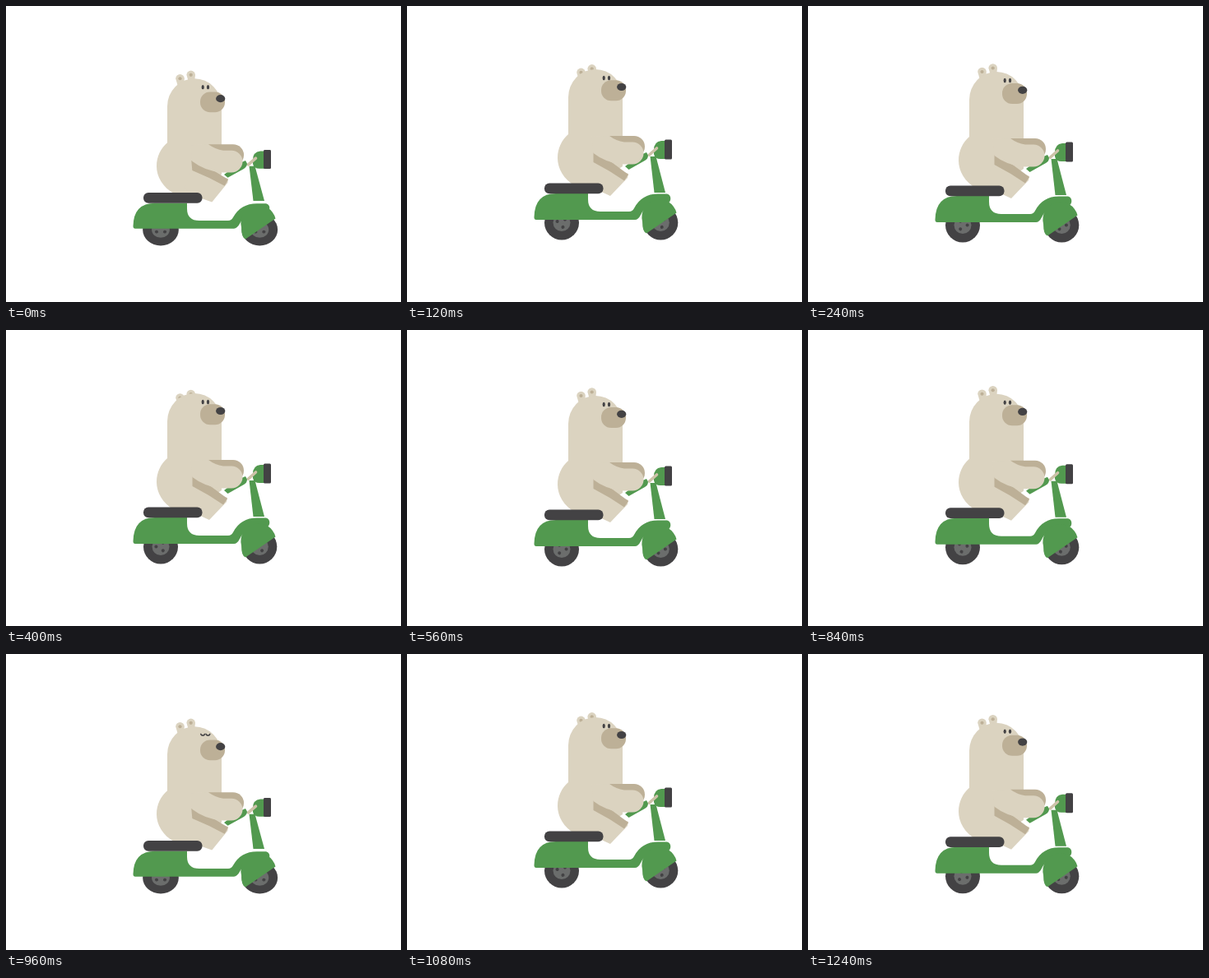
Recreate the animation shown at these times as an HTML page. Size 480 px wide and 360 px high, loop 1.28 s.

```html
<!DOCTYPE html>
<html lang="en">
<head>
<meta charset="utf-8">
<title>Bear on a scooter</title>
<style>
  html, body { margin: 0; height: 100%; overflow: hidden; background: #fff; }
  svg { display: block; width: 100vw; height: 100vh; }
  .fur { fill: #dbd3c0; }
  .tan { fill: #bdb097; }
  .green { fill: #52994f; }
  .dark { fill: #434244; }
  .hub { fill: #6b6d6c; }
</style>
</head>
<body>
<svg viewBox="0 0 480 360">
  <defs>
    <g id="wheel">
      <circle class="dark" r="21"/>
      <circle class="hub" r="10.5"/>
      <g class="dark spin">
        <circle cx="5.6" r="2"/>
        <circle cx="5.6" r="2" transform="rotate(120)"/>
        <circle cx="5.6" r="2" transform="rotate(240)"/>
      </g>
    </g>
    <g id="ear">
      <path class="fur" d="M-5.3 0a5.3 5.3 0 0 1 10.6 0l-1 9h-7z"/>
      <circle class="tan" r="2.1"/>
    </g>
  </defs>

  <g class="tire" data-x="188"><use href="#wheel"/></g>
  <g class="tire" data-x="308.300"><use href="#wheel"/></g>

  <g id="steering">
    <path class="green" d="M295.500 186H302.500L314 230H300.500Z"/>
    <path class="green" d="M314 167H309Q300 168 300 178V183Q301 189 308 189H314Z"/>
    <rect class="dark" x="313" y="165.500" width="9" height="24" rx="1.500"/>
    <path d="M294.500 184L303.500 176" stroke="#cdc2a8" stroke-width="3.600" stroke-linecap="round"/>
  </g>

  <g id="frame" class="green">
    <path d="M157 263Q154.500 263 154.500 260Q155 231 181 231H220V238Q220 253 235 253H270Q274 253 276 249Q285 231.500 305 231.500H316A6 6 0 0 1 316 243H310Q291 242 284 257Q281 263 277 263Z"/>
  </g>

  <g id="bear">
    <g id="ears">
      <use href="#ear" x="211.500" y="80"/>
      <use href="#ear" x="224.700" y="75.500"/>
    </g>
    <path class="fur" d="M196 114A33 34 0 0 1 262 114V198L226 222H205C190 214 183 200 183 188C183 176 188 166 196 159Z"/>
    <g id="leg">
      <path class="fur" d="M226 190L269 207L268 212L247 234L232 227L215 215Z"/>
      <path class="tan" d="M226.500 181L250 194L269 208L264 215.500Q246 203 226.500 193Z"/>
    </g>
    <path class="tan" d="M246 161H276A13 13 0 0 1 276 187H255Z"/>
    <path class="green" d="M265 198L269.500 202L289 191Q293 188.500 293 184.500L291 181L284 184Z"/>
    <path class="fur" d="M224 162L246 161Q254 167 264 168.500H274A13.500 13.500 0 0 1 274 195.500H262Q242 194 226.500 182Z"/>
    <g id="snout">
      <rect class="tan" x="236" y="94" width="30" height="25" rx="12"/>
      <ellipse class="dark" cx="260.700" cy="102.300" rx="5.600" ry="4.600"/>
    </g>
    <g id="open" class="dark">
      <ellipse cx="239.200" cy="90.500" rx="1.600" ry="2.700"/>
      <ellipse cx="245.500" cy="90.500" rx="1.600" ry="2.700"/>
    </g>
    <path id="closed" d="M236.700 88.500a2.400 2.400 0 0 0 4.800 0M243 88.500a2.400 2.400 0 0 0 4.800 0" fill="none" stroke="#434244" stroke-width="1.500"/>
  </g>

  <rect id="seat" class="dark" x="167" y="218.500" width="71.500" height="12.700" rx="6"/>
  <path id="fender" class="green" d="M291 279.500Q286 278 286 265A21.300 21.300 0 0 1 327.500 254.500Z"/>
</svg>
<script>
const $ = id => document.getElementById(id);
const place = (el, transform) => el.setAttribute("transform", transform);
const shift = (el, y) => place(el, `translate(0 ${y})`);
const squash = (el, y, scale, origin) =>
  place(el, `translate(0 ${y + origin * (1 - scale)}) scale(1 ${scale})`);

const LOOP = 1280, HOP = 320, STEP = 40, HEIGHT = 12, TRAVEL = 5;
const tires = document.querySelectorAll(".tire");
const spinner = document.querySelector(".spin");

// Quick ease-out rise, short hang, then a free fall.
function hopHeight(t) {
  if (t < 80) return HEIGHT * (1 - (1 - t / 80) ** 2);
  if (t < 160) return HEIGHT;
  return HEIGHT * (1 - ((t - 160) / 160) ** 2);
}

function draw(now) {
  const t = Math.floor(now % LOOP / STEP) * STEP;
  const phase = t % HOP;
  const height = hopHeight(phase);
  const y = 9 - height;
  const load = Math.max(0, 1 - height / TRAVEL);
  const lift = Math.max(0, height - TRAVEL);

  squash($("steering"), y, 1 - 0.04 * load, 180);
  shift($("seat"), y - load * 0.4);
  squash($("frame"), y, 1 - 0.03 * load, 219);
  squash($("bear"), y - load * 0.7, 1 - 0.012 * load, 80);
  place($("leg"), `rotate(${-5 * load} 226 195)`);
  shift($("snout"), y * 0.26);
  shift($("ears"), phase < 160 ? 5.5 * Math.sin(Math.PI * phase / 160) : 0);
  shift($("fender"), 4 - lift);

  for (const tire of tires)
    place(tire, `translate(${tire.dataset.x} ${270.5 - lift + load * 1.5}) ` +
      `scale(${1 + 0.04 * load} ${1 - 0.07 * load})`);
  place(spinner, `rotate(${30 + t * 120 / HOP})`);

  const blink = t >= 920 && t < 1040;
  $("open").style.display = blink ? "none" : "";
  $("closed").style.display = blink ? "" : "none";
}

const start = performance.now();
function tick() {
  draw(performance.now() - start);
  requestAnimationFrame(tick);
}
tick();
</script>
</body>
</html>
```
